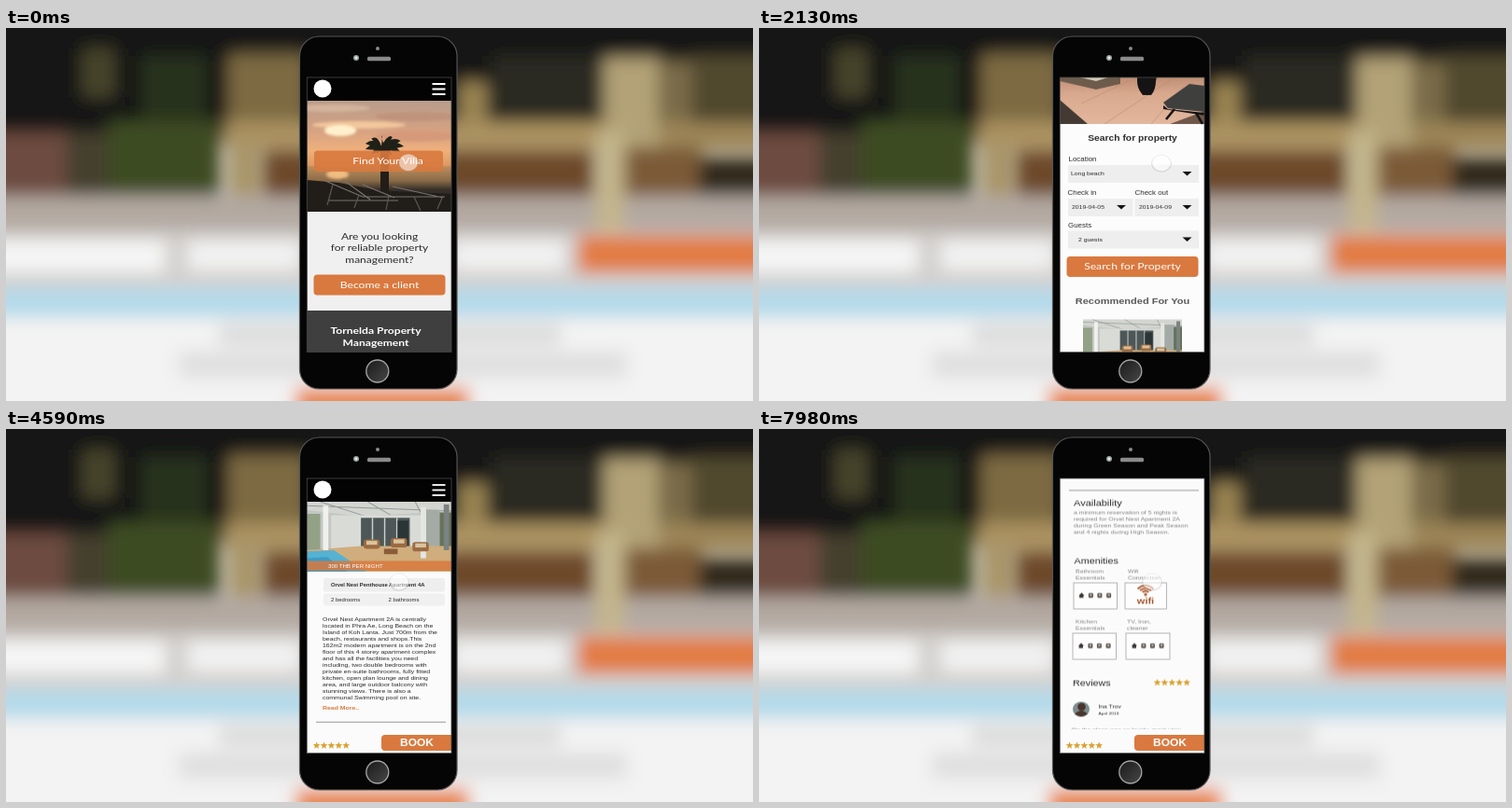
Animation, 800 px wide and 400 px high, one loop 8 s. Source, as an HTML page:

```html
<!DOCTYPE html>
<html lang="en">
<head>
<meta charset="utf-8">
<title>Villa booking on a phone</title>
<style>
html, body { margin: 0; width: 100%; height: 100%; overflow: hidden; background: #ddd; }
svg { display: block; width: 100vw; height: 100vh; }
text { font-family: "Liberation Sans", Arial, sans-serif; fill: #2b2b2b; }
.lato { font-family: Lato, sans-serif; }
.bold { font-weight: 700; }
.mid { text-anchor: middle; }
.white { fill: #fff; }
.soft { fill: #858585; }
.orange { fill: #d9793f; }
.brown { fill: #a3572d; }
#search, #detail, #searchScroll, #detailScroll, #touch { animation: 8s linear infinite; }
#search { animation-name: showSearch; }
#detail { animation-name: showDetail; }
#searchScroll { animation-name: scrollSearch; }
#detailScroll { animation-name: scrollDetail; }
#touch { animation-name: moveTouch; }
@keyframes showSearch { 0%, 5% { opacity: 0; } 8%, 100% { opacity: 1; } }
@keyframes showDetail { 0%, 52.5% { opacity: 0; } 56%, 100% { opacity: 1; } }
@keyframes scrollSearch {
  0%, 12.5% { transform: translateY(0); animation-timing-function: cubic-bezier(.3, .1, .7, .8); }
  26.625% { transform: translateY(-97px); }
  42.375% { transform: translateY(-186px); animation-timing-function: ease-out; }
  50%, 100% { transform: translateY(-250px); }
}
@keyframes scrollDetail {
  0%, 66% { transform: translateY(0); animation-timing-function: ease-in; }
  69.75% { transform: translateY(-27px); }
  85.875% { transform: translateY(-168px); }
  99.75%, 100% { transform: translateY(-248.5px); }
}
@keyframes moveTouch {
  0%, 46.5% { transform: translate(431px, 144px); animation-timing-function: ease-in-out; }
  51%, 100% { transform: translate(421px, 163px); }
}
</style>
</head>
<body>
<svg id="stage" viewBox="0 0 800 400" preserveAspectRatio="none"></svg>
<script>
const STRETCH = 1.16; // the whole screen design is wider than its type
const LATO_STRETCH = 1.25;

const rect = (x, y, w, h, fill, more = '') =>
  `<rect x="${x}" y="${y}" width="${w}" height="${h}" fill="${fill}" ${more}/>`;
const path = (d, fill, more = '') => `<path d="${d}" fill="${fill}" ${more}/>`;
const line = (d, color, width = 1) => path(d, 'none', `stroke="${color}" stroke-width="${width}"`);
const ellipse = (x, y, rx, ry, fill, more = '') =>
  `<ellipse cx="${x}" cy="${y}" rx="${rx}" ry="${ry}" fill="${fill}" ${more}/>`;
const text = (x, y, size, str, cls = '') => {
  const stretch = cls.includes('lato') ? LATO_STRETCH : STRETCH;
  return `<text class="${cls}" font-size="${size}" transform="translate(${x} ${y}) scale(${stretch} 1)">${str}</text>`;
};
const lines = (x, y, step, size, rows, cls) =>
  rows.map((row, i) => text(x, y + i * step, size, row, cls)).join('');
const button = (x, y, w, h, label, cx, opacity = 1) =>
  rect(x, y, w, h, '#d9793f', `rx="4" fill-opacity="${opacity}"`) +
  text(cx, y + h / 2 + 3.4, 9.75, label, 'lato white mid');
const arrow = (x, y) => path(`M${x - 5} ${y - 2}h10l-5 4.4z`, '#111');
const gradient = (id, stops, dir = 'x2="0" y2="1"') => `<linearGradient id="${id}" ${dir}>` +
  stops.map(([at, color]) => `<stop offset="${at}" stop-color="${color}"/>`).join('') + '</linearGradient>';

function star(cx, cy, r) {
  const points = Array.from({ length: 10 }, (_, i) => {
    const a = i * Math.PI / 5, d = i % 2 ? r * .45 : r;
    return `${(cx + d * Math.sin(a)).toFixed(2)},${(cy - d * Math.cos(a)).toFixed(2)}`;
  });
  return `<polygon points="${points.join(' ')}" fill="#d9a435"/>`;
}
const stars = (x, y) => [0, 1, 2, 3, 4].map(i => star(x + i * 7.9, y, 4.1)).join('');

const defs = `<defs>
  <filter id="blur" x="-10%" y="-10%" width="120%" height="120%"><feGaussianBlur stdDeviation="9"/></filter>
  <filter id="soften"><feGaussianBlur stdDeviation="1.4"/></filter>
  <clipPath id="screen"><rect x="322.5" y="53.3" width="154.5" height="294"/></clipPath>
  <clipPath id="heroClip"><rect x="322" y="78" width="155" height="122.5"/></clipPath>
  <clipPath id="villaClip"><rect width="107" height="52"/></clipPath>
  ${gradient('sky', [[0, '#b89d8b'], [.25, '#d3a183'], [.45, '#efb07c'], [.58, '#e09a62'], [.6, '#b98b5c'], [.72, '#8b6b48'], [.8, '#37302a'], [1, '#1e1b19']])}
  ${gradient('deck', [[0, '#b98870'], [.4, '#d9a98e'], [1, '#e2b79d']])}
  ${gradient('key', [[0, '#1a1a1a'], [1, '#474747']], 'x2="1" y2="1"')}
</defs>`;

const backdrop = `<g filter="url(#blur)">` + [
  [-40, -40, 880, 160, '#191816'], [82, 22, 34, 52, '#47452a'], [145, 30, 70, 80, '#28301b'],
  [238, 28, 85, 90, '#7d6a42'], [485, 58, 30, 45, '#9a8452'], [520, 30, 115, 60, '#2c2b22'],
  [640, 32, 60, 110, '#b3a277'], [698, 36, 36, 70, '#7a6c48'], [734, 30, 120, 66, '#51482f'],
  [-40, 112, 110, 72, '#6d4b3f'], [65, 112, 50, 72, '#45402e'],
  [110, 100, 120, 84, '#3e4b24'], [235, 100, 410, 30, '#ab9261'], [238, 120, 34, 66, '#a89468'],
  [275, 131, 355, 52, '#6d4a2b'], [700, 100, 140, 32, '#9c8557'], [660, 128, 85, 56, '#7b5a37'],
  [742, 138, 110, 46, '#33291f'],
  [-40, 180, 920, 50, '#b3a9a1'], [632, 110, 30, 108, '#c3b58c'], [-40, 218, 920, 65, '#d3d0ce'],
  [-40, 228, 210, 34, '#f6f6f6'], [195, 228, 120, 32, '#f2f2f2'], [478, 228, 120, 32, '#f2f2f2'],
  [612, 222, 240, 41, '#e27b42'], [-40, 279, 920, 30, '#b3daeb'], [-40, 311, 920, 130, '#f3f3f3'],
  [228, 318, 366, 22, '#dbdbdb'], [185, 347, 480, 28, '#dfdfdf'], [310, 386, 186, 60, '#e8854b']
].map(b => rect(...b)).join('') + '</g>';

const phone = rect(314.5, 9, 168.5, 378, '#050505', 'rx="21" stroke="#555" stroke-width="1.2"') +
  ellipse(398, 22, 2, 2, '#8a8a8a') + ellipse(375, 32, 3, 3, '#9ba3a2') + ellipse(375, 32, 1.4, 1.4, '#e4eeee') +
  rect(387, 30.8, 25, 4.4, '#8b8b8b', 'rx="1.5"') +
  ellipse(397.8, 368, 12, 12, 'url(#key)', 'stroke="#a5a5a5" stroke-width="1.3"');

const header = rect(322, 53, 156, 25, '#030303') + ellipse(339, 65, 9.5, 9.5, '#fff') +
  [60, 65.5, 71].map(y => line(`M456.5 ${y}h14`, '#fff', 1.8)).join('');

function palm(x, y) {
  const leaves = Array.from({ length: 11 }, (_, i) => {
    const a = i * Math.PI * 2 / 11, fx = x + 21 * Math.cos(a), fy = y + 11 * Math.sin(a);
    return path(`M${x - 3} ${y}Q${(x + fx) / 2} ${(y + fy) / 2 - 9} ${fx} ${fy}Q${(x + fx) / 2} ${(y + fy) / 2 + 3} ${x + 3} ${y + 3}z`, '#1f2118');
  });
  return leaves.join('') + rect(x - 4, y, 9, 48, '#221d17');
}

const sunset = rect(322, 78, 156, 119, 'url(#sky)') +
  `<g clip-path="url(#heroClip)"><g filter="url(#soften)">` +
  ellipse(350, 86, 40, 4, '#d5b49b') + ellipse(440, 95, 45, 5, '#c0937b') +
  ellipse(378, 104, 50, 4, '#f2c79c') + ellipse(358, 110, 17, 6, '#fff0cd') + ellipse(440, 116, 45, 6, '#d69a7a') +
  ellipse(355, 157, 12, 5, '#efbd82') + '</g>' + palm(405, 127) +
  path('M322 163l35 3 40 8 80 4v20H322z', '#211e1a') +
  line('M342 164l40 17h88M360 162l30 22M382 168l34 14M414 170l54 12M345 185h75', '#77736e', 1.2) +
  line('M350 168l-6 22M378 179l-5 14M410 180l-3 15M437 181l7 15M468 180l-6 14', '#5b5651', 1.2) + '</g>';

const terrace = `<g clip-path="url(#heroClip)">` + rect(322, 78, 156, 75, '#cdd4d3') +
  `<g filter="url(#soften)">` +
  [[328, 103, 10], [352, 95, 12], [372, 104, 14], [397, 97, 13], [410, 90, 9], [466, 84, 10]]
    .map(([x, y, r]) => ellipse(x, y, r, r * .8, '#55614a')).join('') + rect(322, 105, 156, 25, '#444c3c') + '</g>' +
  path('M410 122l11-29h57v29z', '#c5754f') +
  [98, 104, 110, 116].map(y => line(`M415 ${y}h63`, '#a25539', .7)).join('') +
  path('M322 106l156 17v32H322z', '#2d2a25') +
  path('M322 103l156 19v3L322 107z', '#12100f') +
  Array.from({ length: 26 }, (_, i) => rect(324 + i * 6, 107 + i * .7, 2, 38 - i * .2, '#12100f')).join('') +
  rect(418, 78, 4.5, 72, '#12100f') + path('M322 78h156v3l-60 1-96-1z', '#1c1815') +
  path('M322 152l70-6h86v54H322z', 'url(#deck)') +
  line('M345 178l60-28M370 200l75-50M420 200l35-40', '#b98b71', .6) +
  path('M322 174l30 26H322z', '#443a33') + path('M440 200l38-14v14z', '#6f5648') +
  path('M322 130l25-7 40 12v22l-26 6-39-9z', '#6d5c4c') +
  path('M322 140l38 7 27-7v6l-26 8-39-9z', '#d4cbbb') +
  [331, 342, 354, 367].map((x, i) => path(`M${x} ${124 + i}l13 2-2 14-13-3z`, i % 2 ? '#bcae98' : '#ded5c6')).join('') +
  path('M405 144h22l-2 10q0 9-5 15h-9q-6-7-6-15z', '#151414') + ellipse(416, 143, 11, 2.5, '#2d2b29') +
  path('M433 177l28-20 17 2v28l-40-4z', '#3f3f3e') + path('M433 180l5 4 40 4v3l-45-7z', '#111') +
  line('M445 184l-9 11M468 188l7 12', '#151414', 2.6) + '</g>';

const villa = (x, y, w, h) => `<g transform="translate(${x} ${y}) scale(${w / 107} ${h / 52})" clip-path="url(#villaClip)">` +
  rect(0, 0, 107, 52, '#c3c7c4') + path('M0 0h107v7L40 11 0 6z', '#d3d5d1') +
  line('M0 3l107 4M10 0l34 11M45 0l17 10M80 0l4 8', '#949a98', .7) +
  rect(0, 9, 10, 27, '#93a186') + path('M18 10h70v26H18z', '#d9dbd7') + rect(40, 12, 36, 22, '#4d5757') +
  [48, 57, 66].map(px => rect(px, 12, 1, 22, '#ccd0cc')).join('') + rect(67, 14, 8, 20, '#2c3535') +
  rect(88, 6, 10, 30, '#a4aba7') + rect(98, 8, 9, 28, '#64745a') +
  path('M0 36l40-3h67v19H0z', '#d0ad7c') + path('M0 37l20-1 24 16H0z', '#55b2d2') + path('M0 42l15-1 15 11H0z', '#3a9dc7') +
  rect(12, 3, 4, 33, '#f0f0ec') + rect(84, 4, 4, 38, '#e4e6e2') + rect(101, 2, 4, 34, '#7b8280') +
  [[42, 28], [62, 27], [78, 30]].map(([px, py]) => rect(px, py, 12, 7, '#9b6b42', 'rx="2"') + rect(px + 2, py + 1, 8, 3, '#d9c39e')).join('') +
  rect(57, 35, 10, 4, '#8a5d38') + '</g>';

const nightVilla = (x, y) => rect(x, y, 107, 52, '#151c36') + rect(x + 36, y, 71, 9, '#28448d') +
  rect(x + 45, y + 12, 50, 20, '#c7a261') + path(`M${x} ${y + 35}h107v17H${x}z`, '#2f6cae') + rect(x, y + 30, 45, 10, '#202b2b');

function card(y, photo, name) {
  return rect(340, y + 55, 122, 54, '#f8f8f8') + line(`M341 ${y + 108}h121`, '#d5d5d5', 1) +
    photo(347, y, 106, 52) + rect(339, y + 43, 122, 9.5, '#d9793f', 'fill-opacity=".88"') +
    text(350, y + 49.3, 5.25, '300 THB PER NIGHT', 'white') +
    [[60, 14, 69, name], [77, 13, 85.3, '2 bedrooms'], [91.5, 12, 99.5, '2 bathrooms']]
      .map(([top, h, base, label]) => rect(345, y + top, 115, h, '#f0f0f0') + text(350.5, y + base, 5.1, label)).join('');
}

const home = header + sunset + button(330, 131.5, 138, 22.5, 'Find Your Villa', 409, .9) +
  rect(322, 197, 156, 106, '#f0f0f0') +
  lines(400, 226.8, 12.4, 9.6, ['Are you looking', 'for reliable property', 'management?'], 'lato mid') +
  button(329.5, 264.5, 141, 22, 'Become a client', 400) +
  rect(322, 303, 156, 45, '#3f3f3f') +
  lines(396, 327.8, 12.8, 9.7, ['Tornelda Property', 'Management'], 'lato bold white mid');

const field = (x, y, w, label, lx, value, vx) =>
  text(lx, y - 3.6, 6.85, label) + rect(x, y, w, 19, '#eeeeee', 'rx="1"') +
  text(vx, y + 11.2, 5.9, value) + arrow(x + w - 12.5, y + 9);

const search = `<g id="search"><g id="searchScroll">` + rect(322, 53, 156, 700, '#fcfcfc') + header + terrace +
  text(400, 218.3, 8.9, 'Search for property', 'bold mid') +
  field(331, 244, 140, 'Location', 331.5, 'Long beach', 334) +
  field(331, 280, 69.5, 'Check in', 330.5, '2019-04-05', 335) +
  field(402.5, 280, 68.5, 'Check out', 402.5, '2019-04-09', 407) +
  field(331, 314.5, 140, 'Guests', 331, '2 guests', 342) +
  button(329.5, 342, 141, 22, 'Search for Property', 400) +
  `<g opacity=".78">` + text(400, 393, 9.5, 'Recommended For You', 'bold mid') + '</g>' +
  card(409.5, villa, 'Orvel Nest Penthouse Apartment 4A') +
  card(530, nightVilla, 'Orvel Nest Garden Apartment 2B') + '</g></g>';

const icons = (x, y) => [0, 9.8, 19.3, 29].map((dx, i) => {
  const cx = x + dx;
  return (i ? rect(cx - 2.4, y - 2.5, 5, 5, '#5b544e', 'rx="1"') + rect(cx - 1, y - 1.2, 2.2, 1.6, '#cfc9c3')
    : path(`M${cx - 3} ${y}l3-3 3 3h-1v2.6h-4.4v-2.6z`, '#3f3935'));
}).join('');

const box = (x, y, w, h) => rect(x, y, w, h, '#fdfdfd', 'stroke="#a3a3a3" stroke-width=".8"');

const wifi = ellipse(414, 426, 1.7, 1.7, '#b3653a') +
  [4, 7, 10].map(r => line(`M${414 - r * .85} ${426 - r * .6}Q414 ${426 - r * 1.35} ${414 + r * .85} ${426 - r * .6}`, '#b3653a', 2)).join('') +
  text(414, 436, 9.5, 'wifi', 'bold mid brown');

const avatar = ellipse(345, 549, 9, 8, '#7d8d90') + ellipse(345.5, 546.5, 4.3, 4.3, '#4a352d') +
  path('M338 554q7-7 14 0-7 6-14 0z', '#4a352d');

const detail = `<g id="detail">` + rect(322, 53, 156, 295, '#fbfbfb') + `<g id="detailScroll">` + header +
  villa(322, 78, 155.5, 75) + rect(322, 141.5, 156, 10.5, '#d9793f', 'fill-opacity=".85"') +
  text(345, 148.6, 5.25, '300 THB PER NIGHT', 'white') +
  rect(340, 160, 130, 14.5, '#eeeeee', 'rx="2"') + rect(340, 176.5, 130, 13, '#f0f0f0', 'rx="2"') +
  text(348, 169.3, 5.05, 'Orvel Nest Penthouse Apartment 4A', 'bold') +
  text(348, 185, 5.1, '2 bedrooms') + text(409.5, 185, 5.1, '2 bathrooms') +
  lines(339, 205.6, 7.03, 5.98, [
    'Orvel Nest Apartment 2A is centrally', 'located in Phra Ae, Long Beach on the', 'Island of Koh Lanta. Just 700m from the',
    'beach, restaurants and shops.This', '162m2 modern apartment is on the 2nd', 'floor of this 4 storey apartment complex',
    'and has all the facilities you need', 'including, two double bedrooms with', 'private en-suite bathrooms, fully fitted',
    'kitchen, open plan lounge and dining', 'area, and large outdoor balcony with', 'stunning views. There is also a',
    'communal Swimming pool on site.']) +
  text(339, 301.3, 5.95, 'Read More..', 'bold orange') + line('M332 314.3h139', '#9a9a9a', 1) +
  text(337, 330.8, 9.5, 'Availability') +
  lines(337, 339.8, 7, 5.98, ['a minimum reservation of 5 nights is', 'required for Orvel Nest Apartment 2A',
    'during Green Season and Peak Season', 'and 4 nights during High Season.'], 'soft') +
  text(337.5, 392.5, 9.3, 'Amenities') +
  lines(339, 402.8, 7, 5.95, ['Bathroom', 'Essentials'], 'soft') + lines(395, 402.8, 7, 5.95, ['Wifi', 'Connection'], 'soft') +
  box(337, 413.5, 46.5, 28) + icons(345.5, 427) + box(392, 413.5, 44.5, 28) + wifi +
  lines(339, 456.9, 7, 5.95, ['Kitchen', 'Essentials'], 'soft') + lines(394, 456.9, 7, 5.95, ['TV, Iron,', 'cleaner'], 'soft') +
  box(336, 467.5, 46.5, 28) + icons(345, 481) + box(393, 467.5, 47, 28) + icons(402, 481) +
  text(336, 523.6, 9.3, 'Reviews') + stars(426.5, 520.5) + avatar +
  text(363.5, 548.3, 5.8, 'Ina Trov') + text(363.5, 554.6, 4.2, 'April 2019') +
  text(334.5, 573, 5.98, 'On the place was so lovely, great view', 'soft') + '</g>' +
  rect(322, 322, 156, 26, '#fbfbfb') + stars(332.6, 339.5) +
  path('M406 328h72v17h-72q-4 0-4-4v-9q0-4 4-4z', '#d9793f') + text(440, 339.6, 10.3, 'BOOK', 'bold white mid') + '</g>';

const touch = `<g id="touch">` +
  ellipse(0, 1.2, 10.2, 9, 'none', 'stroke="#999" stroke-opacity=".28" stroke-width="1.2"') +
  ellipse(0, .2, 10, 9, '#fff', 'fill-opacity=".55"') + '</g>';

document.getElementById('stage').innerHTML = defs + backdrop + phone +
  `<g clip-path="url(#screen)">${home}${search}${detail}${touch}</g>` +
  rect(322.3, 53, 154.7, 294.5, 'none', 'stroke="#4a4a4a" stroke-width=".8"');
</script>
</body>
</html>
```
